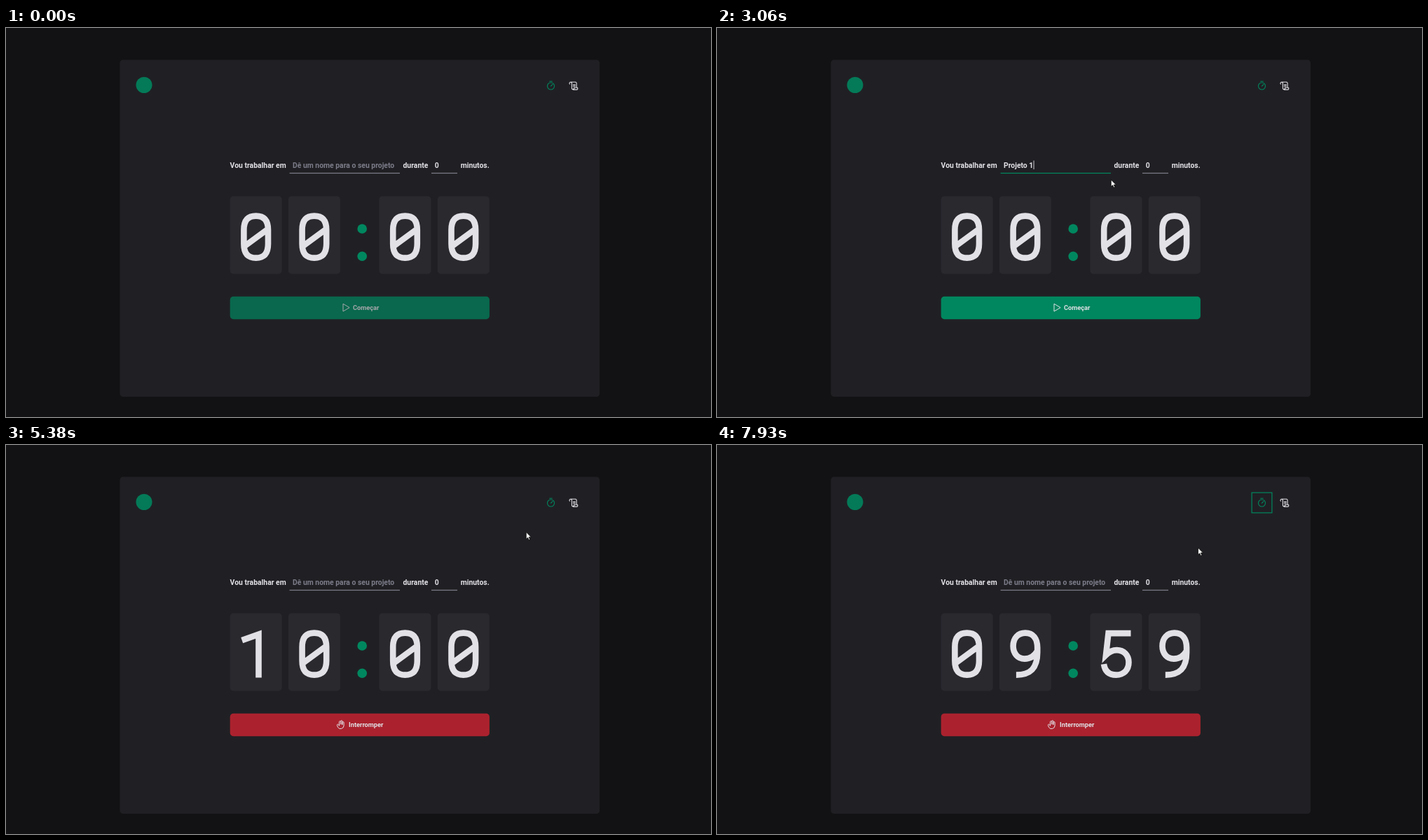
Animation, 1006 px wide and 556 px high, one loop 8000 ms. Source, as an HTML page:

```html
<!DOCTYPE html>
<html lang="pt-BR">
<head>
<meta charset="utf-8">
<style>
  html, body { margin: 0; height: 100%; overflow: hidden; background: #121214; }
  svg { display: block; width: 100vw; height: 100vh; font: 400 8.1px Roboto, sans-serif; }
  text { fill: #e1e1e6; white-space: pre; }
  .form text, .btn text, .b { font-weight: 700; }
  .form text { font-size: 10.4px; }
  .btn text { font-size: 9.25px; }
  .list text { font: 600 7px "Noto Sans", sans-serif; }
  .rows text { fill: #c4c4cc; }
  .line { fill: none; stroke: #e1e1e6; stroke-linejoin: round; stroke-linecap: round; }
  .ring { fill: none; stroke: #00875f; stroke-width: 1.2; }
</style>
</head>
<body>
<svg viewBox="0 0 1006 556">
  <rect x="162.5" y="45.5" width="684.5" height="481.5" rx="4.6" fill="#202024"/>
  <circle cx="197" cy="81.5" r="11.5" fill="#047a58"/>

  <g stroke-width="1.1">
    <path id="clock" class="line" transform="translate(777.5 83)" d="M5 0A5 5 0 1 1 -5 0A5 5 0 1 1 5 0M0 0L2.4 -2.4M-1.8 -6.8H1.8"/>
    <path id="scroll" class="line" transform="translate(810 82.5)" d="M-5.6 -2.3A1.7 1.7 0 1 1 -2.6 -3.4V3.6A1.7 1.7 0 0 0 .7 4C.7 3.4 .3 2.8 .3 2.8H5.6C6.2 5 5.3 5.6 4.6 5.6H-1M-4.3 -5.2H2.5A1.6 1.6 0 0 1 4.1 -3.6V2.8M-.6 -1.4H2.2M-.6 .6H2.2"/>
  </g>
  <g fill="#00875f">
    <rect id="clockBar" x="763.6" y="94.6" width="27.8" height="1.8"/>
    <rect id="scrollBar" x="796.1" y="94.6" width="27.8" height="1.8"/>
  </g>
  <rect id="clockRing" class="ring" x="763.1" y="68.1" width="28.8" height="28.8"/>
  <rect id="scrollRing" class="ring" x="795.6" y="68.1" width="28.8" height="28.8"/>

  <g id="timer">
    <g class="form">
      <text x="319.6" y="200.3">Vou trabalhar em</text>
      <text id="project" x="409" y="199.8"></text>
      <text x="566.5" y="200.3">durante</text>
      <text id="minutes" x="611.7" y="199.8"></text>
      <text x="648.7" y="200.3">minutos.</text>
      <rect id="projectLine" x="404.6" y="206.9" width="157.4" height="1.2"/>
      <rect id="minutesLine" x="607" y="206.9" width="37" height="1.2"/>
      <rect id="caret" y="189.5" width=".9" height="12.5" fill="#e1e1e6"/>
      <g id="spinner">
        <rect x="630.7" y="189.4" width="8.8" height="13.2" fill="#f4f4f4"/>
        <path d="M633 194.6L635.1 192L637.2 194.6ZM633 197.8L635.1 200.4L637.2 197.8Z" fill="#333"/>
      </g>
    </g>
    <g id="digits"></g>
    <g fill="#00875f"><circle cx="508.2" cy="287" r="6.8"/><circle cx="508.2" cy="326.2" r="6.8"/></g>

    <g class="btn">
      <rect id="btnRing" class="ring" x="319" y="383.2" width="371.6" height="33.4" rx="5"/>
      <rect id="btn" x="319.7" y="383.8" width="370.2" height="32.4" rx="4.6"/>
      <g id="start">
        <path class="line" d="M481 394.6V405L489.8 399.8Z"/>
        <text x="495" y="403.1">Começar</text>
      </g>
      <g id="stop">
        <path class="line" transform="translate(477.5 399.7)" d="M2.4 -.3V-3A1.1 1.1 0 0 1 4.6 -3V1.3A4.7 4.7 0 0 1 -4 3.8L-5 1A1 1 0 0 1 -3.2 0L-2 1.6V-4A1.1 1.1 0 0 1 .2 -4V-.8M.2 -.8V-4.8A1.1 1.1 0 0 1 2.4 -4.8V-.3"/>
        <text x="489" y="403.1">Interromper</text>
      </g>
    </g>

    <g id="list" class="list">
      <rect x="461" y="211" width="91" height="159.5" rx="3" fill="#19191e"/>
      <rect id="pick" x="463.5" y="216" width="86" height="20.7" rx="2" fill="#303036"/>
      <path d="M461 301.5H552" stroke="#4a4a50"/>
    </g>
  </g>

  <g id="history">
    <text class="b" x="217.8" y="142.2" font-size="13.9">Meu histórico</text>
    <path d="M218 195.6V169.1A4.6 4.6 0 0 1 222.6 164.5H787A4.6 4.6 0 0 1 791.6 169.1V195.6Z" fill="#323238"/>
    <g id="rows" class="rows"></g>
  </g>

  <g id="cursor" fill="#fff" stroke="#000" stroke-width=".7" stroke-linejoin="round">
    <path id="arrow" d="M0 0V9.8L2.3 7.7L3.8 11.2L5.4 10.5L3.9 7.1H7Z"/>
    <path id="hand" d="M-1.2 .6C-1.2 -.7 1 -.7 1 .6V4.2L5 5C6.2 5.3 6.4 6 6.3 7.2L5.4 12.3H-.4L-3.4 7.8C-3.8 6.6 -2.6 6 -1.2 7.6Z"/>
    <path id="beam" d="M-2 -5H2M0 -5V5M-2 5H2" stroke="#e1e1e6"/>
  </g>
</svg>

<script>
const LOOP = 8000;
const GREEN = '#00875f', WHITE = '#e1e1e6', GREY = '#7c7c8a', RED = '#ab222e';
const OPEN = 1030, CHOOSE = 2520, FOCUS = 3590, TEN = 3870, CLICK = 4830,
      START = 4900, TICK = 5870, HISTORY = 5940, BACK = 7190;

const $ = id => document.getElementById(id);
const show = (id, on) => { $(id).style.display = on ? '' : 'none'; };
const set = (id, name, value) => $(id).setAttribute(name, value);
const add = (id, markup) => $(id).insertAdjacentHTML('beforeend', markup);

// Digit outlines, centred on their card
const GLYPHS = {
  0: 'M-17.3 -10C-17.3 -24 -11 -30 0 -30S17.3 -24 17.3 -10V10C17.3 24 11 30 0 30S-17.3 24 -17.3 10ZM-16 13L16 -10.5',
  1: 'M-20 -19.5L3.8 -28V34',
  5: 'M21 -29.5H-11L-14.5 1.5C-10 -3 -5 -5.5 1 -5.5C11 -5.5 18 2 18 12C18 23 11 30 0 30C-10 30 -16 25 -17.5 14.5',
  9: 'M17 -4C13 3 7 7 -1 7C-11 7 -17.3 -1 -17.3 -11C-17.3 -23 -10 -30 0 -30C11 -30 17.3 -22 17.3 -9V-2C17.3 20 8 30 -13 30'
};
[356.7, 439.9, 569.5, 652.8].forEach((x, i) => add('digits',
  `<rect x="${x - 37}" y="240.4" width="74" height="111" rx="4.6" fill="#29292e"/>
   <path id="digit${i}" transform="translate(${x} 298.6)" fill="none" stroke="${WHITE}" stroke-width="8.6"/>`));

['Projeto 1', 'Projeto 2', 'Projeto 3', 'Banana', 'Namoro', 'namoro', 'l'].forEach((name, i) =>
  add('list', `<text x="468.2" y="${228.7 + 20.8 * i + (i > 3 ? 5.2 : 0)}">${name}</text>`));

const COLUMNS = [232, 514, 581, 701.5];
['Tarefa', 'Duração', 'Duração', 'Status'].forEach((name, i) =>
  add('history', `<text class="b" x="${COLUMNS[i]}" y="182">${name}</text>`));

const STATUS = { Interrompido: RED, 'Concluído': GREEN, 'Em andamento': '#e0aa6c' };
[
  ['Projeto 3', '5 minutos', 'há cerca de 15 horas', 'Interrompido'],
  ['Projeto 1', '5 minutos', 'há cerca de 15 horas', 'Concluído'],
  ['Banana', '10 minutos', 'há cerca de 15 horas', 'Concluído'],
  ['Projeto 2', '20 minutos', 'há 2 minutos', 'Interrompido'],
  ['Projeto 1', '5 minutos', 'há 2 minutos', 'Interrompido'],
  ['Projeto 1', '10 minutos', 'há menos de um minuto', 'Em andamento']
].forEach((cells, row) => {
  const y = 197.7 + 33.75 * row;
  add('rows', `<rect x="218" y="${y}" width="573.6" height="31.9" fill="#29292e"/>
    <circle cx="704" cy="${y + 16.2}" r="2.3" fill="${STATUS[cells[3]]}"/>` +
    cells.map((cell, i) => `<text x="${COLUMNS[i] + (i > 2 ? 9.3 : 0)}" y="${y + 17.8}">${cell}</text>`).join(''));
});

// Pointer path: time, x, y
const PATH = [
  [190, 803, 476], [960, 510, 205], [1330, 510, 205], [1710, 499, 229], [2900, 499, 229],
  [3060, 562, 217], [3330, 635, 194], [4040, 635, 194], [4560, 592, 397], [5000, 592, 397],
  [5380, 742, 125], [5800, 818, 90], [6150, 814, 84], [6290, 814, 84], [6690, 740, 330],
  [7150, 778, 86], [7690, 778, 86], [7930, 686.5, 147], [LOOP, 686.5, 147]
];

function slope(i, axis) {
  const a = PATH[i - 1], b = PATH[i], c = PATH[i + 1];
  if (!a || !c || a[1] === b[1] || b[1] === c[1]) return 0;
  return (c[axis] - a[axis]) / (c[0] - a[0]);
}

function pointer(t) {
  const i = Math.max(0, PATH.findIndex(p => p[0] > t) - 1);
  const a = PATH[i], b = PATH[i + 1], span = b[0] - a[0];
  const u = Math.max(0, (t - a[0]) / span), v = 1 - u;
  return [1, 2].map(k =>
    a[k] * v * v * (1 + 2 * u) + b[k] * u * u * (3 - 2 * u) +
    span * u * v * (slope(i, k) * v - slope(i + 1, k) * u));
}

function render(t) {
  const [x, y] = pointer(t);
  const over = (x0, x1, y0, y1) => x > x0 && x < x1 && y > y0 && y < y1;
  const within = (from, to) => t >= from && t < to;

  const history = within(HISTORY, BACK);
  const running = t >= START;
  const chosen = within(CHOOSE, START);
  const listOpen = within(OPEN, CHOOSE);
  const onProject = within(OPEN, FOCUS);
  const onMinutes = within(FOCUS, CLICK);
  const onClock = over(763, 792, 68, 97);
  const onScroll = over(795, 825, 68, 97);
  const onBtn = !history && (chosen || running) && over(320, 690, 384, 416);

  show('timer', !history);
  show('history', history);
  set('clock', 'style', `stroke:${history ? WHITE : GREEN}`);
  set('scroll', 'style', `stroke:${history ? GREEN : WHITE}`);
  show('clockBar', onClock);
  show('scrollBar', onScroll);
  show('clockRing', t >= BACK);
  show('scrollRing', history);

  $('project').textContent = chosen ? 'Projeto 1' : 'Dê um nome para o seu projeto';
  $('project').style.fill = chosen ? WHITE : GREY;
  $('minutes').textContent = within(FOCUS, TEN) ? '5' : within(TEN, START) ? '10' : '0';
  set('projectLine', 'fill', onProject ? GREEN : GREY);
  set('minutesLine', 'fill', onMinutes ? GREEN : GREY);
  show('spinner', onMinutes || over(607, 644, 187, 208));

  const blink = from => (t - from) % 1060 < 530;
  show('caret', onProject && blink(t < 2550 ? 1100 : 2550) || onMinutes && blink(4070));
  set('caret', 'x', onMinutes ? (t < TEN ? 617.8 : 623.3) : chosen ? 451.6 : 409);

  show('list', listOpen);
  show('pick', over(463, 550, 216, 237));

  const clock = !running ? '0000' : t < TICK ? '1000' : '0959';
  [...clock].forEach((n, i) => set('digit' + i, 'd', GLYPHS[n]));

  const dark = onBtn && t > 4600;
  set('btn', 'fill', running ? (dark ? '#7a1921' : RED) : dark ? '#015f43' : GREEN);
  $('btn').parentNode.style.opacity = t < CHOOSE ? 0.7 : 1;
  show('btnRing', within(CLICK, START));
  show('start', !running);
  show('stop', running);

  const hand = onBtn || onClock || onScroll;
  const beam = !history && (over(405, 562, 187, 208) || over(607, 630, 187, 208));
  show('cursor', t >= 190);
  set('cursor', 'transform', `translate(${x} ${y})`);
  show('hand', hand);
  show('beam', beam);
  show('arrow', !hand && !beam);
}

const begin = performance.now();
function frame() {
  render((performance.now() - begin) % LOOP);
  requestAnimationFrame(frame);
}
frame();
</script>
</body>
</html>
```
